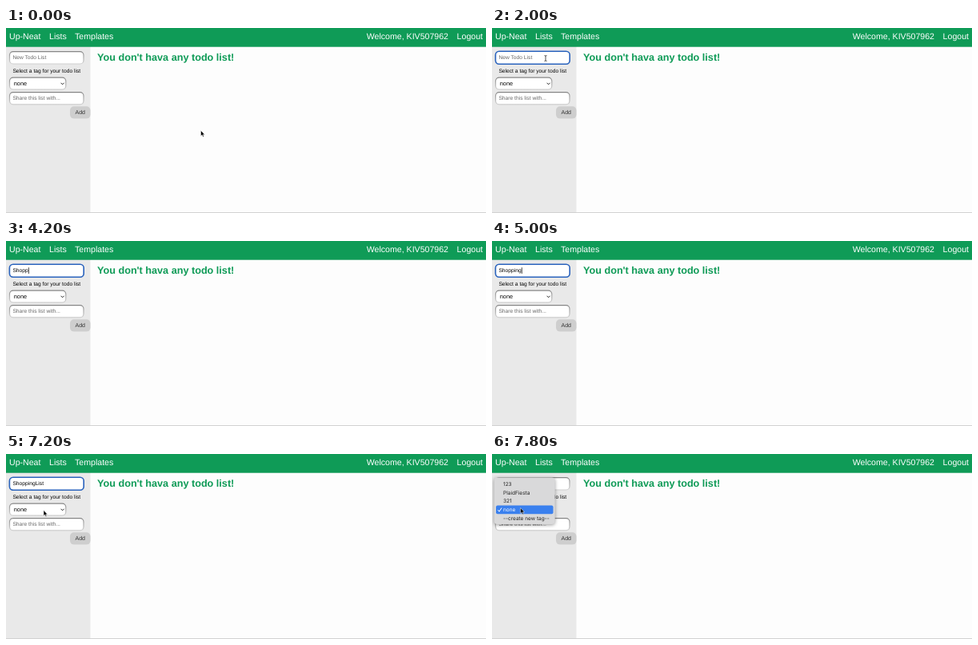
Recreate the animation shown at these times as an HTML page. Size 600 px wide and 232 px high, loop 8000 ms.

```html
<!DOCTYPE html>
<html lang="en">
<head>
<meta charset="utf-8">
<title>Todo lists</title>
<style>
  html, body { margin: 0; width: 100%; height: 100%; overflow: hidden; background: #fdfdfd; }
  svg { display: block; width: 100vw; height: 100vh; }
  text { font-family: "Liberation Sans", Arial, sans-serif; font-size: 6.7px; text-rendering: geometricPrecision; }
  .nav text { font-size: 10.6px; fill: #fff; }
  .heading { font-size: 12.65px; font-weight: bold; fill: #0f9b57; }
  .hint { fill: #666; }
  .menu text { font-family: Inter, sans-serif; font-size: 6.5px; fill: #222; }
  .menu .picked { fill: #fff; }
  .panel { filter: drop-shadow(0 1px 2px rgba(0, 0, 0, .4)); }
  .field { fill: #fff; stroke: url(#inset); stroke-width: 1.2; }
</style>
</head>
<body>
<svg viewBox="0 0 600 232">
  <defs>
    <linearGradient id="inset" x2="0" y2="1">
      <stop offset="0" stop-color="#858585"/>
      <stop offset=".4" stop-color="#aaa"/>
      <stop offset="1" stop-color="#cfcfcf"/>
    </linearGradient>
  </defs>

  <rect width="600" height="232" fill="#fdfdfd"/>
  <rect y="23" width="105.5" height="208" fill="#e9e9e9"/>
  <rect y="231" width="600" height="1" fill="#d2d2d2"/>
  <rect width="600" height="23.7" fill="#0f9b57"/>
  <g class="nav">
    <text x="4" y="14.3">Up-Neat</text>
    <text x="54" y="14.3">Lists</text>
    <text x="86" y="14.3">Templates</text>
    <text x="553" y="14.3" text-anchor="end">Welcome, KIV507962</text>
    <text x="596" y="14.3" text-anchor="end">Logout</text>
  </g>
  <text class="heading" x="114" y="41.2">You don't hava any todo list!</text>

  <rect class="field" x="4.5" y="29.6" width="92.5" height="15.4" rx="4.5"/>
  <rect id="focus" x="4.4" y="29.3" width="92.8" height="15.9" rx="4.5" fill="#fff" stroke="#2a63bd" stroke-width="1.6"/>
  <text id="placeholder" class="hint" x="8.4" y="39.4">New Todo List</text>
  <text id="typed" x="8.4" y="39.4"></text>
  <rect id="caret" y="33.2" width=".7" height="7.8"/>

  <text x="8.4" y="55.6">Select a tag for your todo list</text>
  <rect class="field" x="4.5" y="62.1" width="70.3" height="15" rx="4.5"/>
  <text x="9.8" y="72.2" style="font-size:7.3px">none</text>
  <path d="M68.6 68.8l2 2 2-2" fill="none" stroke="#222" stroke-width="1"/>
  <rect class="field" x="4.5" y="80.6" width="92.5" height="15.2" rx="4.5"/>
  <text class="hint" x="8.4" y="90.4">Share this list with...</text>
  <rect x="80" y="98.2" width="25.5" height="15.4" rx="5" fill="#cecece"/>
  <text x="86.5" y="108.2" fill="#333" style="font-size:7px">Add</text>

  <g id="menu" class="menu">
    <rect class="panel" x="2.7" y="29.5" width="76" height="58.5" rx="4" fill="#d9d9da"/>
    <rect x="5" y="64.4" width="71.5" height="10.8" rx="2" fill="#3a80ee"/>
    <path d="M7.4 70.2l1.6 2 3-4.6" fill="none" stroke="#fff" stroke-width="1"/>
    <text x="14" y="39.9">123</text>
    <text x="14" y="50.7">PlaidFiesta</text>
    <text x="14" y="61.4">321</text>
    <text class="picked" x="14" y="72.2">none</text>
    <text x="14" y="83">--create new tag--</text>
  </g>

  <path id="arrow" d="M0 0V7L1.6 5.6 2.7 8.1 3.9 7.6 2.8 5.2H4.9Z" fill="#000" stroke="#fff" stroke-width=".5"/>
  <path id="beam" d="M-1.5-3.5Q0-3.5 0-2.5Q0-3.5 1.5-3.5M0-2.5V2.5M-1.5 3.5Q0 3.5 0 2.5Q0 3.5 1.5 3.5" fill="none" stroke="#222" stroke-width=".8"/>
</svg>
<script>
  const LOOP = 8000, STEP = 200;
  const FOCUS = 1600, OPEN = 7400, MOUSE_BACK = 6600;
  const TITLE = 'ShoppingList';
  const keyTimes = [3000, 3200, 3600, 3800, 4200, 4400, 4600, 4800, 5400, 5600, 6000, 6200];
  // time, x, y
  const mousePath = [
    [0, 243.5, 128.5], [200, 243.5, 128.5], [1400, 67, 38], [6400, 67, 38],
    [7200, 47, 70.5], [7400, 45.3, 71.2], [7800, 35.6, 67.6], [8000, 35.6, 67.6]
  ];
  const el = Object.fromEntries([...document.querySelectorAll('[id]')].map(e => [e.id, e]));
  const show = (node, on) => node.setAttribute('visibility', on ? 'visible' : 'hidden');

  function mouseAt(t) {
    const i = mousePath.findIndex((p, k) => k > 0 && t <= p[0]);
    const [t0, x0, y0] = mousePath[i - 1], [t1, x1, y1] = mousePath[i];
    const u = (t - t0) / (t1 - t0), e = u * u * (3 - 2 * u);
    return [x0 + (x1 - x0) * e, y0 + (y1 - y0) * e];
  }

  function draw(t) {
    const count = keyTimes.filter(k => k <= t).length;
    const focused = t >= FOCUS && t < OPEN;
    el.typed.textContent = TITLE.slice(0, count);
    const caretX = 8.6 + (count ? el.typed.getComputedTextLength() : 0);
    el.caret.setAttribute('x', caretX);
    show(el.placeholder, !count);
    show(el.focus, focused);

    const typing = count > 0 && t <= MOUSE_BACK;
    const blink = (t - FOCUS) % 1000 < 400;
    show(el.caret, focused && (typing || blink));
    show(el.menu, t >= OPEN);

    const [x, y] = mouseAt(t);
    const visible = t < keyTimes[0] || t >= MOUSE_BACK;
    const inField = x > 4 && x < 97 && y > 29 && y < 45;
    show(el.arrow, visible && !inField);
    show(el.beam, visible && inField);
    for (const pointer of [el.arrow, el.beam]) pointer.setAttribute('transform', `translate(${x} ${y})`);
  }

  const start = performance.now();
  function tick() {
    const t = (performance.now() - start) % LOOP;
    draw(Math.floor(t / STEP) * STEP);
    requestAnimationFrame(tick);
  }
  tick();
</script>
</body>
</html>
```
